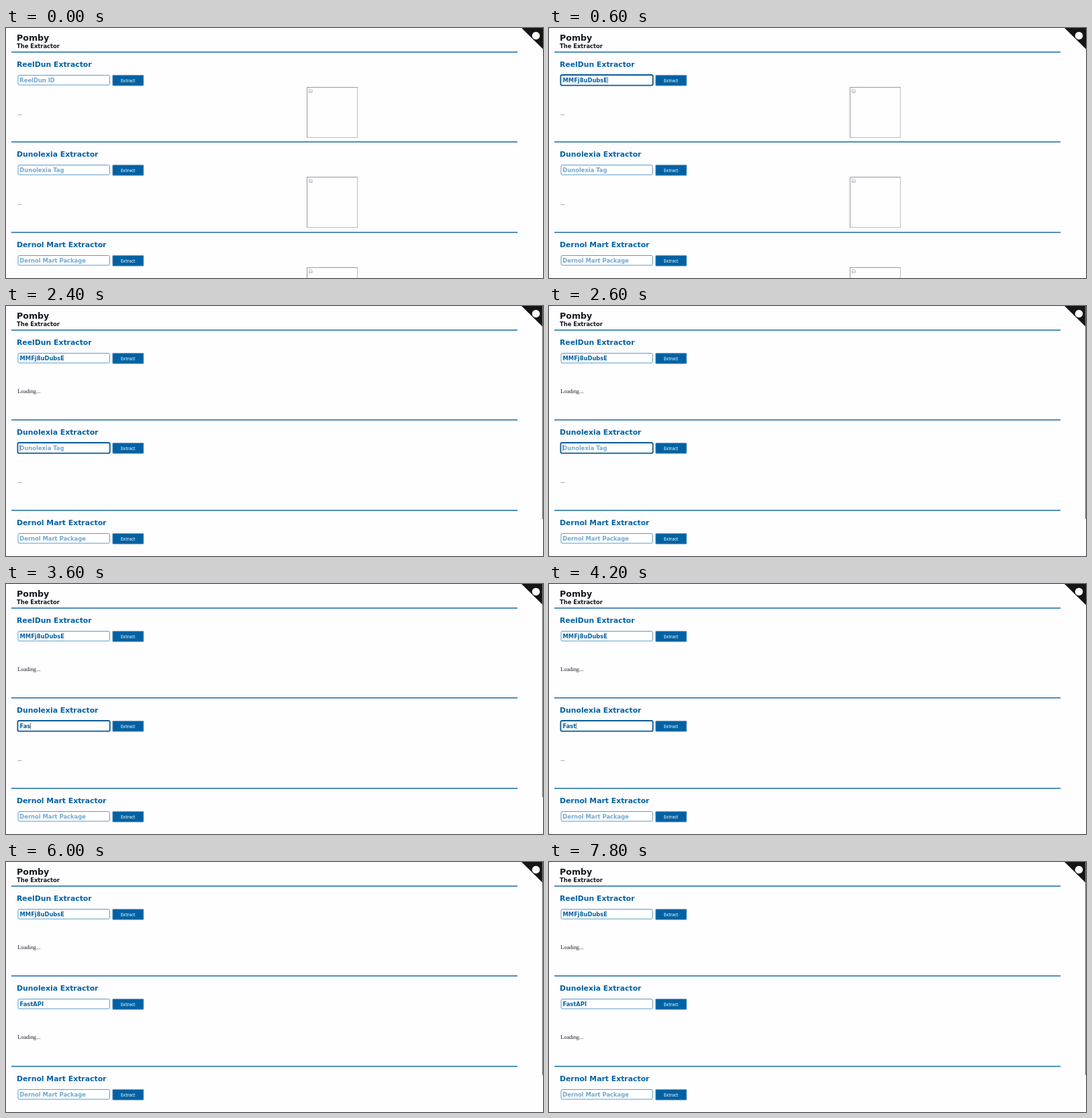
An HTML page that plays this animation: 800 by 373 pixels, repeating every 8 s.

```html
<!DOCTYPE html>
<html lang="en">
<head>
<meta charset="utf-8">
<title>The Extractor</title>
<style>
  html, body { margin: 0; width: 100%; height: 100%; overflow: hidden; background: #fefdff; }
  svg { display: block; width: 800px; height: 373px; }
  text { font: bold 8.37px "DejaVu Sans", sans-serif; fill: #12181f; white-space: pre; }
  .title { font-size: 12.6px; }
  .head { font-size: 10.85px; fill: #0062a3; }
  .value { fill: #0062a3; }
  .hint { fill: #74a8cf; }
  .label { font: 6.67px "Noto Sans", sans-serif; fill: #fff; text-anchor: middle; }
  .note { font: 8.37px "Liberation Serif", serif; fill: #222; }
  .rule { fill: #1a6da6; }
  .field { fill: #fff; stroke: #5b9bc9; }
  .focus { fill: #fff; stroke: #0a5b93; stroke-width: 1.8; }
  .button { fill: #0062a3; stroke: #5f93bb; stroke-width: .8; }
  .caret { fill: #444; }
  .frame { fill: none; stroke: #bdbdbd; }
  .edge { fill: none; stroke: #9a9a9a; }
  .icon { fill: #f4f4f4; stroke: #b5b5b5; stroke-width: .8; }
</style>
</head>
<body>
<svg viewBox="0 0 800 373">
  <text class="title" x="16" y="19">Pomby</text>
  <text x="16" y="30.3">The Extractor</text>
  <g id="sections"></g>
  <path d="M768 0H800V31.5Z" fill="#151513"/>
  <circle cx="789.5" cy="11.5" r="5.8" fill="#fff"/>
  <rect id="scrollbar" x="798.8" width="1.2" height="318" fill="#777"/>
</svg>
<script>
const LOOP = 8000;
const STEP = 134.3;
const IMAGES_GONE = 2400;
const CARET_X = 20.5;

// keys: [time, number of characters shown]
const sections = [
  { name: "ReelDun", hint: "ID", text: "MMFj8uDubsE", focus: [200, 1800], load: 1800,
    caret: [200, 1400], keys: [[400, 11]] },
  { name: "Dunolexia", hint: "Tag", text: "FastAPI", focus: [2400, 5800], load: 6000,
    caret: [2400, 5200],
    keys: [[3200, 1], [3400, 2], [3600, 3], [3800, 4], [4400, 5], [4800, 6], [5000, 7]] },
  { name: "Dernol Mart", hint: "Package", text: "", focus: [], load: Infinity, caret: [], keys: [] }
];

const within = (t, [from, to]) => t >= from && t < to;
const show = (el, on) => el.setAttribute("visibility", on ? "visible" : "hidden");

function build({ name, hint }, i) {
  return `<g transform="translate(0 ${Math.round(i * STEP)})">
    <rect class="rule" x="8" y="35.2" width="754" height="1.5"/>
    <text class="head" x="16" y="58">${name} Extractor</text>
    <rect class="field" x="18" y="70.5" width="136.5" height="14.5" rx="2"/>
    <rect class="focus" x="17.4" y="70" width="137.4" height="15.6" rx="2.2"/>
    <text class="hint" x="20.3" y="80.8">${name} ${hint}</text>
    <text class="value" x="20.5" y="80.8"></text>
    <rect class="caret" y="73" width=".7" height="9.5"/>
    <rect class="button" x="158.9" y="70.4" width="46" height="15.6" rx=".8"/>
    <text class="label" x="181.7" y="80.6">Extract</text>
    <text class="note" x="17.2" y="129.6">...</text>
    <g class="image">
      <rect class="frame" x="448.5" y="88.5" width="75" height="75"/>
      <path class="edge" d="M448.5 163.5V88.5H523.5"/>
      <path class="icon" d="M451.3 91.2H454.6L456.2 92.8V96.4H451.3Z M451.5 96L453.3 94L454.5 95.2L456 93.8"/>
    </g>
  </g>`;
}

const root = document.getElementById("sections");
root.innerHTML = sections.map(build).join("");
const scrollbar = document.getElementById("scrollbar");
const parts = [...root.children].map(g => {
  const find = name => g.querySelector("." + name);
  return { focus: find("focus"), hint: find("hint"), value: find("value"),
           caret: find("caret"), note: find("note"), image: find("image") };
});

function draw(t) {
  sections.forEach((s, i) => {
    const p = parts[i];
    const count = s.keys.reduce((n, [at, chars]) => t >= at ? chars : n, 0);
    p.value.textContent = s.text.slice(0, count);
    p.note.textContent = t >= s.load ? "Loading..." : "...";
    show(p.hint, !count);
    show(p.focus, within(t, s.focus));
    show(p.caret, within(t, s.caret));
    show(p.image, t < IMAGES_GONE);
    p.caret.setAttribute("x", CARET_X + (count ? p.value.getComputedTextLength() : 0));
  });
  show(scrollbar, within(t, [800, 4000]) || t >= 5400);
}

function tick() {
  draw(performance.now() % LOOP);
  requestAnimationFrame(tick);
}
tick();
</script>
</body>
</html>
```
